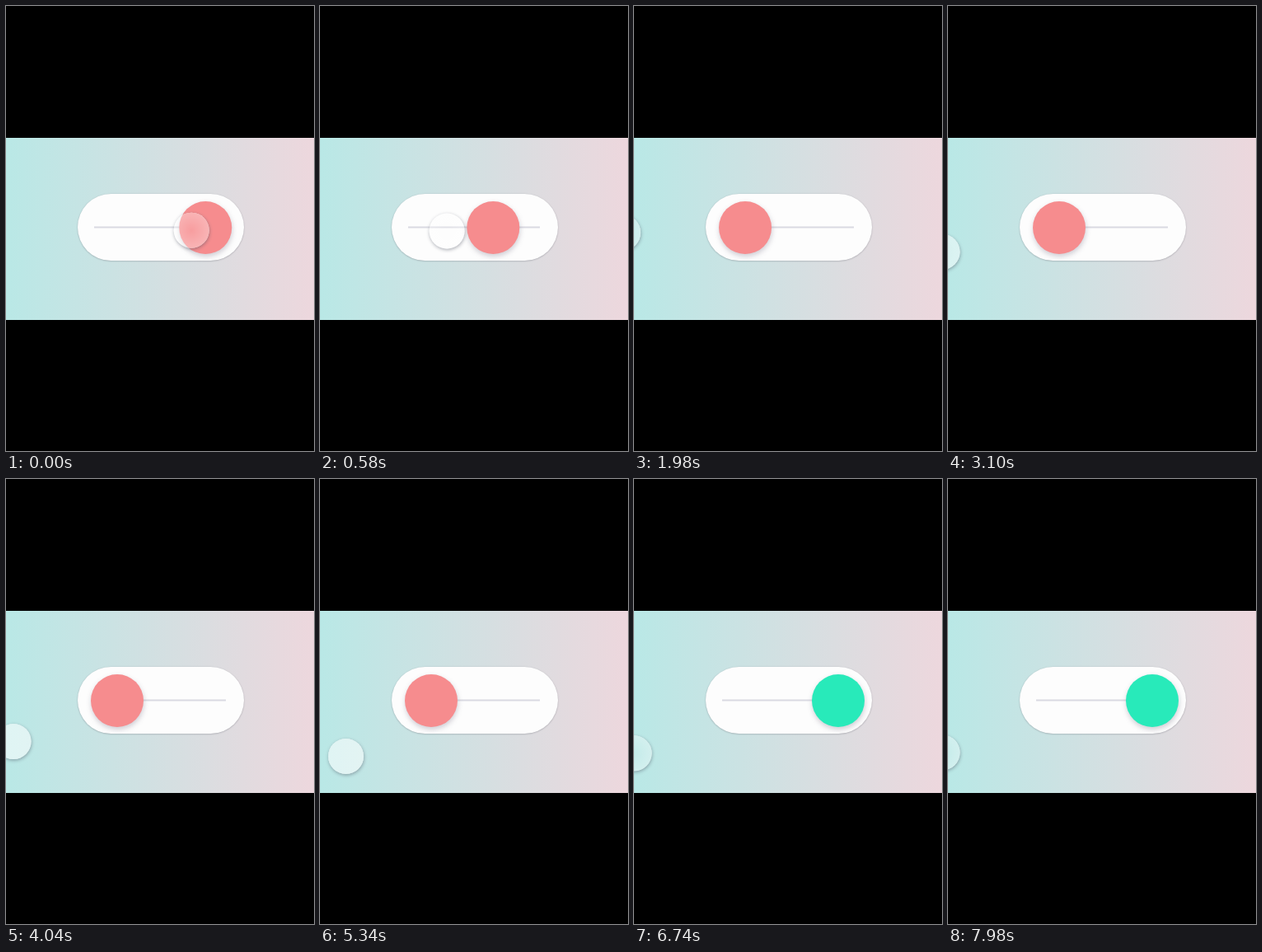
An HTML page with a canvas for the animation above (8 s loop, 374 by 540 pixels).

```html
<!DOCTYPE html>
<html lang="en">
<head>
<meta charset="utf-8">
<title>Toggle</title>
<style>
  html, body { margin: 0; height: 100%; overflow: hidden; background: #000; }
  canvas { display: block; }
</style>
</head>
<body>
<canvas id="stage" width="374" height="540"></canvas>
<script>
const LOOP = 8000;
const SWITCH_ON = 5440;
const ctx = document.getElementById('stage').getContext('2d');

const progress = (t, start, length) => Math.max(0, Math.min(1, (t - start) / length));
const mix = (a, b, p) => a + (b - a) * p;
const easeInOut = u => (1 - Math.cos(Math.PI * u)) / 2;
const easeOut = u => 1 - (1 - u) ** 2;

// The drag to the left moves the knob and the cursor together
const drag = t => easeInOut(progress(t, -340, 2350));

function knobX(t) {
  return t < SWITCH_ON
    ? mix(248, 135, drag(t))
    : mix(135, 248, easeInOut(progress(t, SWITCH_ON, 1200)));
}

function cursorAt(t) {
  if (t < 2010) return [mix(238, -13.5, drag(t)), mix(272, 275, drag(t))];
  if (t < SWITCH_ON) {
    const u = progress(t, 2010, 2870);
    return [mix(-13.5, 31.5, u * u), mix(275, 336.5, u)];
  }
  const p = easeOut(progress(t, SWITCH_ON, 2280));
  return [mix(31.5, -7, p), mix(336.5, 332, p)];
}

// 1 while the cursor is held down, 0 while it is free
function pressure(t) {
  return 1 - easeInOut(progress(t, 2010, 1800)) + easeInOut(progress(t, SWITCH_ON, 400));
}

function shadow(color, x, y, blur) {
  ctx.shadowColor = color;
  ctx.shadowOffsetX = x;
  ctx.shadowOffsetY = y;
  ctx.shadowBlur = blur;
}

function circle(x, y, r, fill) {
  ctx.beginPath();
  ctx.arc(x, y, r, 0, 2 * Math.PI);
  ctx.fillStyle = fill;
  ctx.fill();
}

function drawBand() {
  const g = ctx.createLinearGradient(0, 0, 374, 0);
  g.addColorStop(0, '#b9e8e6');
  g.addColorStop(1, '#edd7dd');
  ctx.fillStyle = g;
  ctx.fillRect(0, 160, 374, 221);
}

function drawTrack() {
  ctx.save();
  shadow('rgba(80,80,90,.4)', 0, .5, 2);
  ctx.beginPath();
  ctx.roundRect(87, 228, 202, 81, 40.5);
  ctx.fillStyle = '#fdfdfd';
  ctx.fill();
  ctx.restore();
  ctx.fillStyle = '#dadae2';
  ctx.fillRect(107, 267.5, 160, 2);
}

function drawKnob(t) {
  ctx.save();
  shadow('rgba(120,115,135,.35)', .5, 3, 6);
  circle(knobX(t), 269, 32, t < SWITCH_ON ? '#f68c8e' : '#28eaba');
  ctx.restore();
}

function drawCursor(t) {
  const [x, y] = cursorAt(t), r = 21.5, press = pressure(t);
  ctx.save();
  // Keep the shadow outside the translucent disc
  ctx.beginPath();
  ctx.rect(-60, 160, 500, 221);
  ctx.arc(x, y, r, 0, 2 * Math.PI);
  ctx.clip('evenodd');
  shadow('rgba(70,75,90,.45)', .5, 1.5, 4);
  circle(x, y, r, '#fff');
  ctx.restore();

  const g = ctx.createRadialGradient(x, y, 0, x, y, r);
  g.addColorStop(0, `rgba(255,255,255,${.55 - .4 * press})`);
  g.addColorStop(1, `rgba(255,255,255,${.55 - .2 * press})`);
  circle(x, y, r, g);
}

function draw(t) {
  ctx.fillStyle = '#000';
  ctx.fillRect(0, 0, 374, 540);
  drawBand();
  drawTrack();
  drawKnob(t);
  drawCursor(t);
}

const start = performance.now();
function loop() {
  draw((performance.now() - start) % LOOP);
  requestAnimationFrame(loop);
}
loop();
</script>
</body>
</html>
```
